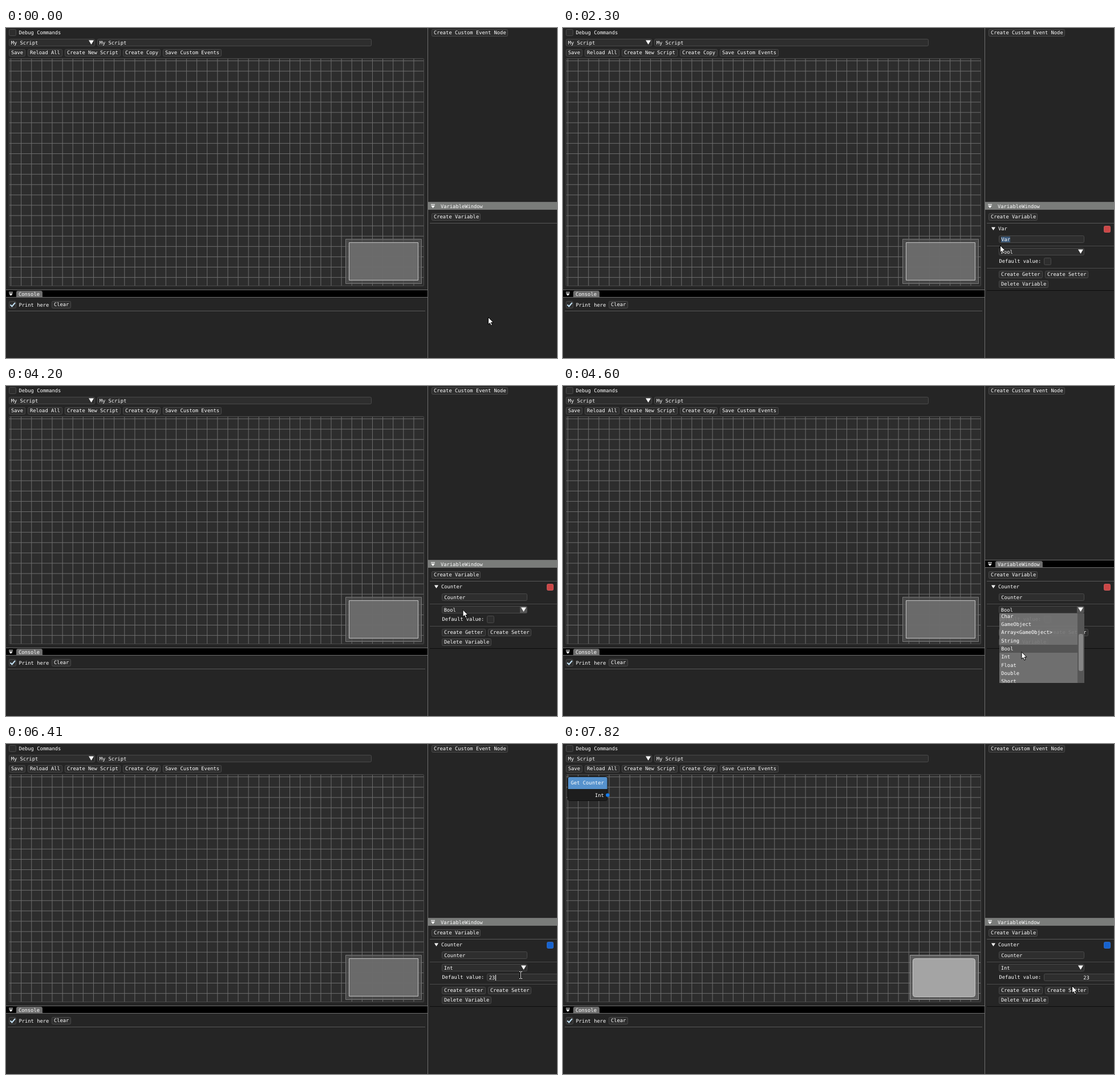
An HTML page with a canvas for the animation above (8 s loop, 966 by 579 pixels).

```html
<!DOCTYPE html>
<html lang="en">
<head>
<meta charset="utf-8">
<title>Variable editor</title>
<style>
html, body { margin: 0; width: 100%; height: 100%; overflow: hidden; background: #252525; }
canvas { display: block; }
</style>
</head>
<body>
<canvas id="stage" width="966" height="579"></canvas>
<script>
const ctx = document.getElementById('stage').getContext('2d');
const LOOP = 8000;
const CHAR = 5.28;
const FIELD = '#2e2e2e', HOVER = '#6f6f6f', EDGE = '#4a4a4a', RULE = '#585858';
const TYPES = ['Char', 'GameObject', 'Array<GameObject>', 'String', 'Bool', 'Int', 'Float', 'Double', 'Short'];

// Pointer path: time, x, y
const PATH = [
  [0, 845, 507], [600, 803, 328], [700, 800, 330], [900, 772, 350], [1200, 756, 356],
  [1400, 756, 356], [1800, 798, 370], [1900, 794, 370], [2100, 741, 371], [2300, 766, 381],
  [3800, 766, 381], [4100, 800, 391], [4300, 801, 393], [4600, 803.5, 466], [4700, 804, 466],
  [4900, 803, 476], [5100, 803, 474], [5400, 798, 428], [5510, 838, 411], [5810, 900, 405],
  [6010, 902, 405], [6520, 902, 405], [6920, 876, 478], [7020, 868, 478], [7320, 802, 430],
  [7420, 800, 430], [7820, 892, 424]
];

function pointerAt(t) {
  const i = PATH.findIndex(p => p[0] > t);
  if (i < 0) return PATH[PATH.length - 1].slice(1);
  const [a, b] = [PATH[i - 1], PATH[i]];
  const k = (t - a[0]) / (b[0] - a[0]);
  return [a[1] + (b[1] - a[1]) * k, a[2] + (b[2] - a[2]) * k];
}

function fill(x, y, w, h, color) {
  ctx.fillStyle = color;
  ctx.fillRect(x, y, w, h);
}

function box(x, y, w, h, color, edge = EDGE, radius = 2) {
  ctx.beginPath();
  ctx.roundRect(x + .5, y + .5, w - 1, h - 1, radius);
  ctx.fillStyle = color;
  ctx.fill();
  ctx.strokeStyle = edge;
  ctx.lineWidth = 1;
  ctx.stroke();
}

function text(str, x, baseline) {
  ctx.fillStyle = '#fff';
  ctx.fillText(str, x, baseline);
}

function polygon(points, color, outline) {
  ctx.beginPath();
  points.forEach(([x, y]) => ctx.lineTo(x, y));
  ctx.closePath();
  ctx.fillStyle = color;
  ctx.fill();
  if (outline) {
    ctx.strokeStyle = outline;
    ctx.lineWidth = 1;
    ctx.stroke();
  }
}

function arrow(x, y, w, h) {
  polygon([[x, y], [x + w, y], [x + w / 2, y + h]], '#fff');
}

function button(label, x, y, w, hot) {
  box(x, y, w, 13, hot ? HOVER : FIELD);
  text(label, x + 4, y + 9.3);
}

function input(label, x, y, w) {
  box(x, y, w, 13, FIELD);
  text(label, x + 3.7, y + 9.7);
}

function combo(label, x, y, w, hot) {
  input(label, x, y, w);
  if (hot) fill(x + w - 13, y + 1, 12, 11, '#555');
  arrow(x + w - 11, y + 2.5, 9, 7.5);
}

function titleBar(label, x, y, w, focused) {
  fill(x, y - 1, w, 1, '#6e6e6e');
  fill(x, y, w, 13, focused ? '#7a7c7a' : '#000');
  if (!focused) {
    ctx.beginPath();
    ctx.roundRect(x + 18, y + 1, label.length * CHAR + 9, 12, [3, 3, 0, 0]);
    ctx.fillStyle = '#6e6e6e';
    ctx.fill();
  }
  fill(x, y + 12, w, 1, '#6e6e6e');
  fill(x + 5, y + 3, 7, 1, '#fff');
  arrow(x + 5, y + 5.5, 7, 4.5);
  text(label, x + 22, y + 10);
}

function caret(x, y) {
  fill(Math.round(x), y, 1, 10, '#fff');
}

function drawGraph(hasNode) {
  box(5, 53, 728, 400, '#2d2d2d', EDGE, 1);
  ctx.fillStyle = '#6e6e6e';
  for (let x = 8.02; x < 731; x += 18.113) ctx.fillRect(x, 54, 1, 398);
  for (let y = 57.14; y < 451; y += 18.094) ctx.fillRect(6, y, 726, 1);

  if (hasNode) {
    box(608, 370, 121, 79, 'rgba(100,100,100,.85)', '#a0a0a0', 0);
    box(613, 376, 110, 68, 'rgba(168,168,168,.95)', '#c8c8c8', 4);
    box(8, 57, 70, 43, '#1d1d1d', '#111', 3);
    ctx.beginPath();
    ctx.roundRect(9, 58, 68.5, 21, [3, 3, 0, 0]);
    ctx.fillStyle = '#5692cd';
    ctx.fill();
    text('Get Counter', 13.7, 71.3);
    text('Int', 56, 93);
    ctx.beginPath();
    ctx.arc(78.3, 89.6, 3.2, 0, 7);
    ctx.fillStyle = '#147df0';
    ctx.fill();
  } else {
    box(595, 370, 134, 79, 'rgba(80,80,80,.8)', '#777', 0);
    box(601, 376, 122, 67, 'rgba(112,112,112,.85)', '#c4c4c4', 0);
  }
}

function drawMainWindow(hasNode) {
  box(5, 2, 13, 12, FIELD);
  text('Debug Commands', 22.5, 11.3);
  combo('My Script', 5, 19, 151);
  input('My Script', 160, 19, 481);
  button('Save', 5, 37, 29);
  button('Reload All', 38, 37, 61);
  button('Create New Script', 103, 37, 98);
  button('Create Copy', 205, 37, 66);
  button('Save Custom Events', 275, 37, 103);
  drawGraph(hasNode);

  titleBar('Console', 0, 460, 739, false);
  box(5, 479, 13, 13, FIELD);
  ctx.beginPath();
  ctx.moveTo(7.5, 485.5);
  ctx.lineTo(10.5, 488.5);
  ctx.lineTo(16, 482);
  ctx.strokeStyle = '#c4e2f5';
  ctx.lineWidth = 2;
  ctx.stroke();
  text('Print here', 22.5, 488.7);
  button('Clear', 80, 479, 34);
  fill(3, 496, 732, 1, RULE);
}

function typedName(t) {
  if (t < 2600) return 'Var';
  const count = t < 2800 ? 1 : t < 3000 ? 2 : 3 + Math.floor((t - 3000) / 100);
  return 'Counter'.slice(0, count);
}

function drawTypeList(py) {
  fill(765, 399, 149, 122, 'rgba(118,118,118,.92)');
  ctx.save();
  ctx.beginPath();
  ctx.rect(765, 400, 149, 120.5);
  ctx.clip();
  TYPES.forEach((type, i) => {
    const mid = 403.5 + i * 14.33;
    const hot = Math.abs(py - mid) <= 7.1;
    if (type === 'Bool' || hot) fill(765, Math.round(mid - 7), 137, 14, type === 'Bool' ? '#545454' : '#5a5a5a');
    text(type, 768.3, mid + 3.2);
  });
  ctx.restore();
  fill(902, 399, 12, 122, '#565656');
  ctx.beginPath();
  ctx.roundRect(904, 435, 8, 65, 3);
  ctx.fillStyle = '#858585';
  ctx.fill();
}

function drawValue(t) {
  box(843, 403, 140, 13, FIELD);
  if (t >= 5910 && t < 6920) {
    if (t < 6410) fill(847, 405, 6, 10, '#3b5878');
    const value = t < 6410 ? '0' : '23';
    text(value, 846.7, 412.8);
    if (t >= 6410) caret(857.5, 405);
  } else {
    const value = t < 6920 ? '0' : '23';
    text(value, 917.5 - value.length * CHAR / 2, 412.8);
  }
}

function drawVariable(t, over, listOpen) {
  const name = typedName(t), isInt = t >= 5000, open = t >= 1300;
  if (over(746, 346, 220, 12)) fill(746, 346, 220, 12, '#191919');
  if (open) arrow(751, 349.5, 7, 5.5);
  else polygon([[752, 348.5], [757.5, 352], [752, 355.5]], '#fff');
  text(name, 763, 355.2);
  box(948, 347, 12, 12, isInt ? '#1763cf' : '#cb4747', isInt ? '#2f6cc4' : '#c85a5a', 2);
  if (!open) {
    fill(743, 362, 223, 1, '#0c0c0c');
    return;
  }

  box(764, 364, 150, 13, FIELD);
  if (t >= 2000 && t < 2600) fill(768, 366, 16, 10, '#3b5878');
  text(name, 768.3, 374);
  if (t >= 2600 && t < 4200) caret(768.5 + name.length * CHAR, 366);
  fill(743, 382, 223, 1, EDGE);

  combo(isInt ? 'Int' : 'Bool', 764, 386, 150, listOpen || over(764, 386, 150, 13));
  text('Default value:', 764.5, 412);
  if (isInt) drawValue(t);
  else box(843, 403, 13, 13, FIELD);
  fill(743, 421, 223, 1, EDGE);

  button('Create Getter', 764, 426, 77, !listOpen && over(764, 426, 76, 13));
  button('Create Setter', 845, 426, 76, over(845, 426, 76, 13));
  button('Delete Variable', 764, 443, 87, !listOpen && over(764, 443, 87, 13));
  fill(743, 460, 223, 1, '#0c0c0c');
}

function drawPointer(x, y, beam) {
  if (beam) {
    x = Math.round(x);
    y = Math.round(y);
    fill(x - 1, y - 6, 3, 13, '#000');
    fill(x, y - 5, 1, 11, '#fff');
    fill(x - 2, y - 6, 2, 1, '#fff');
    fill(x + 1, y - 6, 2, 1, '#fff');
    fill(x - 2, y + 6, 2, 1, '#fff');
    fill(x + 1, y + 6, 2, 1, '#fff');
    return;
  }
  const shape = [[0, 0], [0, 12.5], [2.8, 10], [4.8, 14.5], [7, 13.5], [5, 9.2], [9, 9.2]];
  polygon(shape.map(([dx, dy]) => [x + dx + .5, y + dy + .5]), '#fff', '#000');
}

function drawSidePanel(t) {
  const [px, py] = pointerAt(t);
  const over = (x, y, w, h) => px >= x && px < x + w && py >= y && py < y + h;
  const listOpen = t >= 4300 && t < 5000;

  fill(739, 0, 1, 579, '#6e6e6e');
  button('Create Custom Event Node', 746, 2, 134);
  titleBar('VariableWindow', 740, 306, 226, !listOpen);
  button('Create Variable', 746, 325, 86, over(746, 325, 86, 13));
  fill(743, 342, 223, 1, RULE);
  if (t >= 700) drawVariable(t, over, listOpen);
  if (listOpen) drawTypeList(py);

  const inName = t >= 1400 && t < 2300 && py >= 364 && py < 377 && px < 914;
  const inValue = t >= 5610 && t < 6720 && over(843, 402, 123, 14);
  drawPointer(px, py, inName || inValue);
}

// The screen refreshes in 100 ms steps, slightly delayed later in the loop.
function snap(t) {
  const delay = t < 5450 ? 0 : t < 6500 ? 10 : 20;
  return Math.floor((t - delay) / 100) * 100 + delay;
}

function draw(now) {
  const t = snap(now % LOOP);
  ctx.font = '8.77px "DejaVu Sans Mono", monospace';
  ctx.textRendering = 'geometricPrecision';
  fill(0, 0, 966, 579, '#252525');
  drawMainWindow(t >= 7520);
  drawSidePanel(t);
  requestAnimationFrame(draw);
}
requestAnimationFrame(draw);
</script>
</body>
</html>
```
